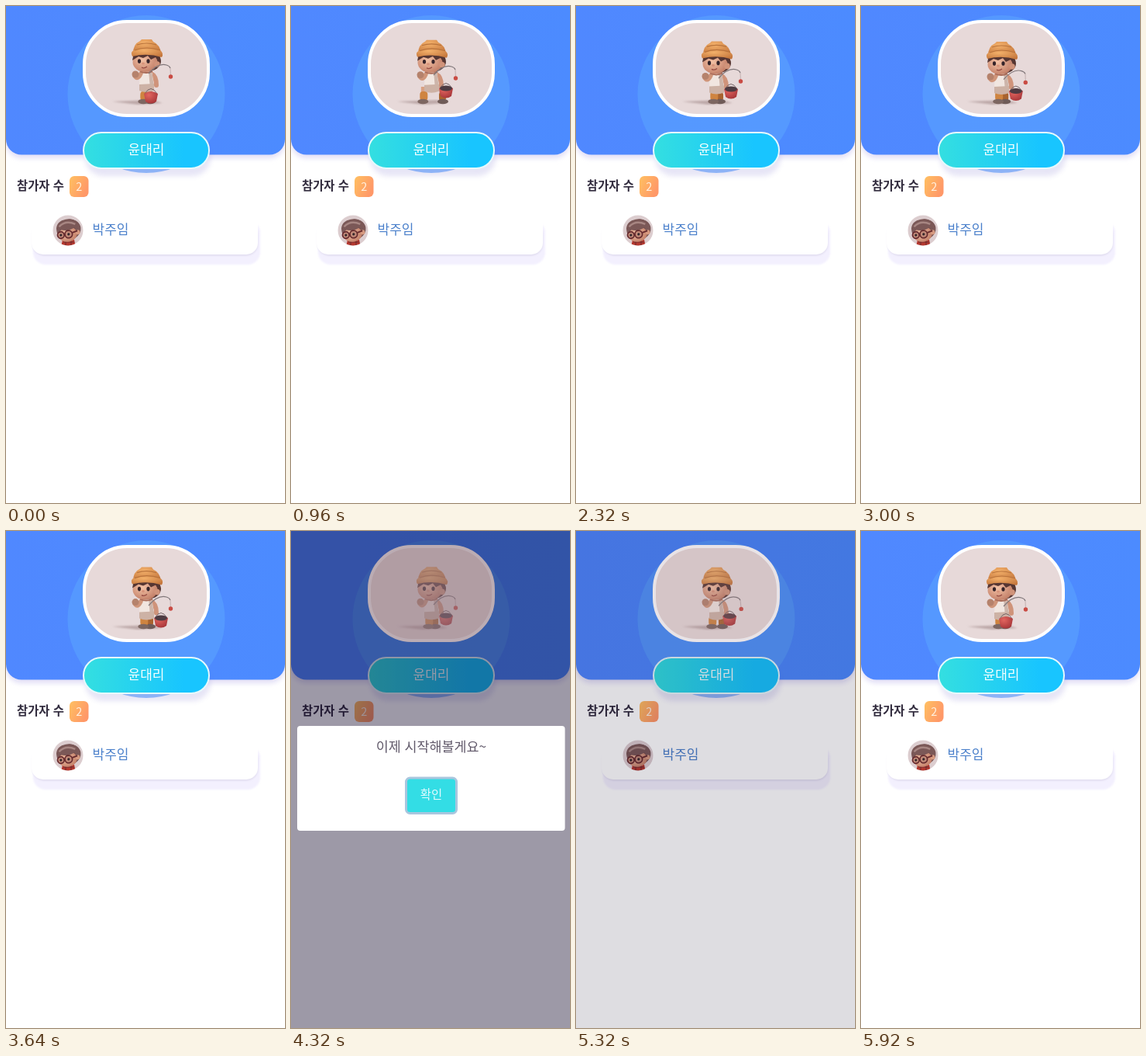
An HTML page for the animation above (5960 ms loop, 360 by 640 pixels).

```html
<!DOCTYPE html>
<html lang="ko">
<head>
<meta charset="utf-8">
<style>
html, body { margin: 0; width: 100%; height: 100%; overflow: hidden; background: #fff; }
svg { display: block; width: 360px; height: 640px; }
text { font: 17px "Noto Sans CJK KR", "Noto Sans CJK", sans-serif; }
.mid { text-anchor: middle; }
</style>
</head>
<body>
<svg viewBox="0 0 360 640">
  <defs>
    <linearGradient id="sky"><stop stop-color="#5088ff"/><stop offset="1" stop-color="#4c8bff"/></linearGradient>
    <linearGradient id="aqua"><stop stop-color="#34dfe0"/><stop offset=".8" stop-color="#18c5ff"/></linearGradient>
    <linearGradient id="amber" x2="1" y2=".5"><stop stop-color="#ffc061"/><stop offset="1" stop-color="#ff9868"/></linearGradient>
    <radialGradient id="hat" cx=".4" cy=".25" r=".8"><stop stop-color="#f3b06a"/><stop offset="1" stop-color="#c4763c"/></radialGradient>
    <radialGradient id="skin" cx=".4" cy=".4" r=".65"><stop stop-color="#f3c2a6"/><stop offset="1" stop-color="#c17d66"/></radialGradient>
    <radialGradient id="red" cx=".35" cy=".3" r=".8"><stop stop-color="#e2655f"/><stop offset="1" stop-color="#a23236"/></radialGradient>
    <filter id="blur" x="-30%" y="-30%" width="160%" height="160%"><feGaussianBlur stdDeviation="3"/></filter>
    <filter id="soft"><feGaussianBlur stdDeviation="1.200"/></filter>
    <clipPath id="round"><circle cx="80" cy="289" r="19.500"/></clipPath>
  </defs>

  <!-- header -->
  <path d="M0 0H360V176a20 20 0 0 1-20 20H20a20 20 0 0 1-20-20Z" fill="#e2dff6" filter="url(#blur)"/>
  <path d="M0 0H360V171.500a20 20 0 0 1-20 20H20a20 20 0 0 1-20-20Z" fill="url(#sky)"/>
  <circle cx="181" cy="113.500" r="101.500" fill="#5aa1ff" opacity=".64"/>
  <rect x="101" y="20" width="160" height="121" rx="55" fill="#e7d9d9" stroke="#fff" stroke-width="4"/>

  <!-- angler -->
  <path d="M137 123L188 121L202 125L170 127Z" fill="#bda9a9" filter="url(#soft)"/>
  <g id="angler">
    <g id="backLeg">
      <path d="M184 104V121" stroke="#bd8068" stroke-width="7"/>
      <rect x="180" y="111" width="9" height="11" rx="3.500" fill="#a9632f"/>
      <ellipse cx="185" cy="123" rx="7" ry="3.300" fill="#6f5b58"/>
    </g>
    <g id="frontLeg">
      <path d="M179 104V121" stroke="#d9a182" stroke-width="7"/>
      <rect x="174" y="110" width="10" height="12" rx="4" fill="#cf8440"/>
      <ellipse cx="178" cy="123" rx="7" ry="3.300" fill="#7d6661"/>
    </g>
    <g id="torso">
      <path d="M187 88Q194 91 194 103" stroke="#cf937a" stroke-width="6" fill="none" stroke-linecap="round"/>
      <path d="M173 83H188L191 105Q181 109 172 105Z" fill="#f1e6e0"/>
      <path d="M184 84H188L191 105L186 107Z" fill="#cdb5aa"/>
      <path d="M172 102L191 101L191 110Q181 114 172 110Z" fill="#cdb2a5"/>
      <path d="M174 88Q170 97 166 91" stroke="#cf957a" stroke-width="5.500" fill="none" stroke-linecap="round"/>
      <circle cx="167" cy="89" r="4.500" fill="#b5826c"/>
      <path d="M173 85Q181 89 189 85" stroke="#a96b58" stroke-width="2" fill="none"/>
      <ellipse cx="183" cy="72" rx="17" ry="13" fill="#563632"/>
      <ellipse cx="179.500" cy="73" rx="16" ry="13" fill="url(#skin)"/>
      <path d="M163 71L165 61H199L198 75L193 67L187 70L183 65L177 68L171 66Z" fill="#563632"/>
      <circle cx="195" cy="76" r="3.800" fill="#d0937a"/>
      <ellipse cx="172" cy="72" rx="2.100" ry="2.800" fill="#35242a"/>
      <ellipse cx="183.500" cy="72" rx="2.100" ry="2.800" fill="#35242a"/>
      <ellipse cx="177" cy="75" rx="2" ry="1.600" fill="#d7937a"/>
      <path d="M175 80Q178 82 182 79" stroke="#954b42" stroke-width="1.300" fill="none"/>
      <path d="M164 62Q164 50 173 46L175 44H188L190 47Q199 51 200 62Z" fill="url(#hat)"/>
      <path d="M163 66Q160 60 165 58Q181 53 199 58Q204 62 201 67Q182 61 163 66Z" fill="url(#hat)"/>
      <path d="M166 58Q181 52 199 58M169 51Q181 47 194 51" stroke="#b9733c" stroke-width="1.200" fill="none"/>
    </g>
    <path id="rod" stroke="#80777a" stroke-width="1.200" fill="none"/>
    <path id="line" stroke="#b9a5a5" stroke-width=".8"/>
    <circle id="float" r="2.700" fill="#c94b43"/>
    <g id="bucket">
      <path d="M-8 -4Q0 -17 8 -4" stroke="#756568" fill="none"/>
      <path d="M-9 -4Q0 -10 9 -4L7 6Q0 11 -7 6Z" fill="url(#red)"/>
      <ellipse id="rim" cy="-4" rx="8" ry="3.500" fill="#4d3b42"/>
    </g>
  </g>

  <!-- host name -->
  <rect x="102" y="172" width="162" height="47" rx="23.500" fill="#6a62c8" opacity=".16" filter="url(#blur)"/>
  <rect x="100" y="163" width="162" height="46" rx="23" fill="url(#aqua)" stroke="#e6fafc" stroke-width="2"/>
  <text class="mid" x="181" y="191" fill="#f5ffff">윤대리</text>

  <!-- participants -->
  <text x="14" y="237.300" fill="#332d3f" style="font-size:15.400px;font-weight:700">참가자 수</text>
  <rect x="82" y="219" width="24.500" height="27" rx="6" fill="url(#amber)"/>
  <text class="mid" x="94.300" y="237.500" fill="#fff0e0" style="font-size:14.500px">2</text>
  <rect x="35" y="276" width="293" height="57" rx="16" fill="#f3f0fe" filter="url(#soft)"/>
  <rect x="34" y="280" width="291" height="41.500" rx="15" fill="#dfdbee" filter="url(#soft)"/>
  <rect x="33" y="259" width="292" height="61" rx="15" fill="#fff"/>
  <g clip-path="url(#round)">
    <rect x="60" y="269" width="40" height="40" fill="#dccdcf"/>
    <path d="M73 301H88L90 310H71Z" fill="#b5382f"/>
    <path d="M74 304H88M77 301V309M84 301V309" stroke="#6b2a2e"/>
    <g transform="rotate(-12 80 290)">
      <ellipse cx="82" cy="288" rx="15" ry="13" fill="#6d4a4b"/>
      <ellipse cx="79" cy="294" rx="12" ry="9.500" fill="url(#skin)"/>
      <path d="M66 291Q64 278 75 275Q93 272 97 288L95 294Q90 292 89 287Q79 291 71 286Z" fill="#7b5857"/>
      <path d="M70 282Q80 275 91 283" stroke="#a78682" stroke-width="2.500" fill="none"/>
      <circle cx="92" cy="294" r="3" fill="#d79a80"/>
      <g fill="#c18a78" stroke="#672b2e" stroke-width="1.800">
        <circle cx="70" cy="293" r="4.300"/><circle cx="80" cy="294" r="4.800"/><path d="M85 293L92 292"/>
      </g>
      <circle cx="70" cy="293" r="1.600" fill="#35272b"/><circle cx="80" cy="294" r="1.600" fill="#35272b"/>
    </g>
  </g>
  <text x="111.500" y="294" fill="#4b80cb">박주임</text>

  <!-- dialog -->
  <g id="overlay">
    <rect width="360" height="640" fill="#0c0025" opacity=".4"/>
    <rect x="99" y="18" width="164" height="125" rx="57" fill="#ffd8cc" opacity=".3"/>
  </g>
  <g id="dialog">
    <rect x="8" y="251" width="345.500" height="135" rx="4" fill="#fff"/>
    <text class="mid" x="181" y="284" fill="#61596a" style="font-size:17.400px">이제 시작해볼게요~</text>
    <rect x="148.500" y="318" width="65" height="45.500" rx="5" fill="#33dde5" stroke="#a9c6de" stroke-width="3"/>
    <text class="mid" x="181" y="345" fill="#e3faff" style="font-size:15.400px">확인</text>
  </g>
</svg>
<script>
const LOOP = 5960, OPEN = 3860, CLOSE = 5120;
const $ = id => document.getElementById(id);
const set = (id, name, value) => $(id).setAttribute(name, value);
const move = (id, x, y) => set(id, 'transform', `translate(${x} ${y})`);

// time, walk cycles, bucket height when swung out, float height, stride
const walk = [
  [0, 0, 112, 91, 1], [960, 1.5, 110, 93, 11], [2320, 3.5, 111, 97, 1],
  [3640, 5.5, 116, 100, 1], [4320, 6.5, 113, 99, 1], [4960, 7, 113, 100, 1],
  [5920, 8, 113, 101, 1], [LOOP, 8.05, 113, 101, 1]
];
const pop = [[0, .5], [135, 1.05], [240, .95], [300, 1]];

function at(keys, t) {
  const i = keys.findIndex(k => k[0] > t);
  if (i < 0) return keys.at(-1).slice(1);
  if (!i) return keys[0].slice(1);
  const a = keys[i - 1], b = keys[i], u = (t - a[0]) / (b[0] - a[0]);
  return a.slice(1).map((v, j) => v + (b[j + 1] - v) * u);
}

const fade = (t, ms) => Math.min(1, Math.max(0, t / ms));

function drawAngler(t) {
  const [cycle, lift, floatY, stride] = at(walk, t);
  const phase = cycle * 2 * Math.PI;
  const swing = (1 - Math.cos(phase)) / 2;
  const sway = Math.sin(phase);
  const step = stride + 6 * sway * sway;
  const floatX = 212.500 + sway, tip = floatY - 13;
  move('torso', 0, (floatY - 91) * .4 - 1);
  move('frontLeg', -step * .7, 0);
  move('backLeg', step, 0);
  set('rod', 'd', `M184 ${tip + 9}Q196 ${tip - 5} 207 ${tip - 2}Q211 ${tip - 1} 212 ${tip + 2}`);
  set('line', 'd', `M212 ${tip + 2}L${floatX} ${floatY}`);
  move('float', floatX, floatY);
  move('bucket', 187 + 13 * swing, 117 + (lift - 117) * swing);
  set('rim', 'opacity', swing);
}

function drawDialog(t) {
  const out = t - CLOSE;
  const [scale] = at(pop, t - OPEN);
  set('overlay', 'opacity', fade(t - OPEN, 300) * (1 - fade(out, 300)));
  set('dialog', 'opacity', fade(t - OPEN, 200) * (1 - fade(out, 200)));
  set('dialog', 'transform', `translate(181 318.500) scale(${scale}) translate(-181 -318.500)`);
}

function frame(now) {
  const t = now % LOOP;
  drawAngler(t);
  drawDialog(t);
  requestAnimationFrame(frame);
}
frame(performance.now());
</script>
</body>
</html>
```
